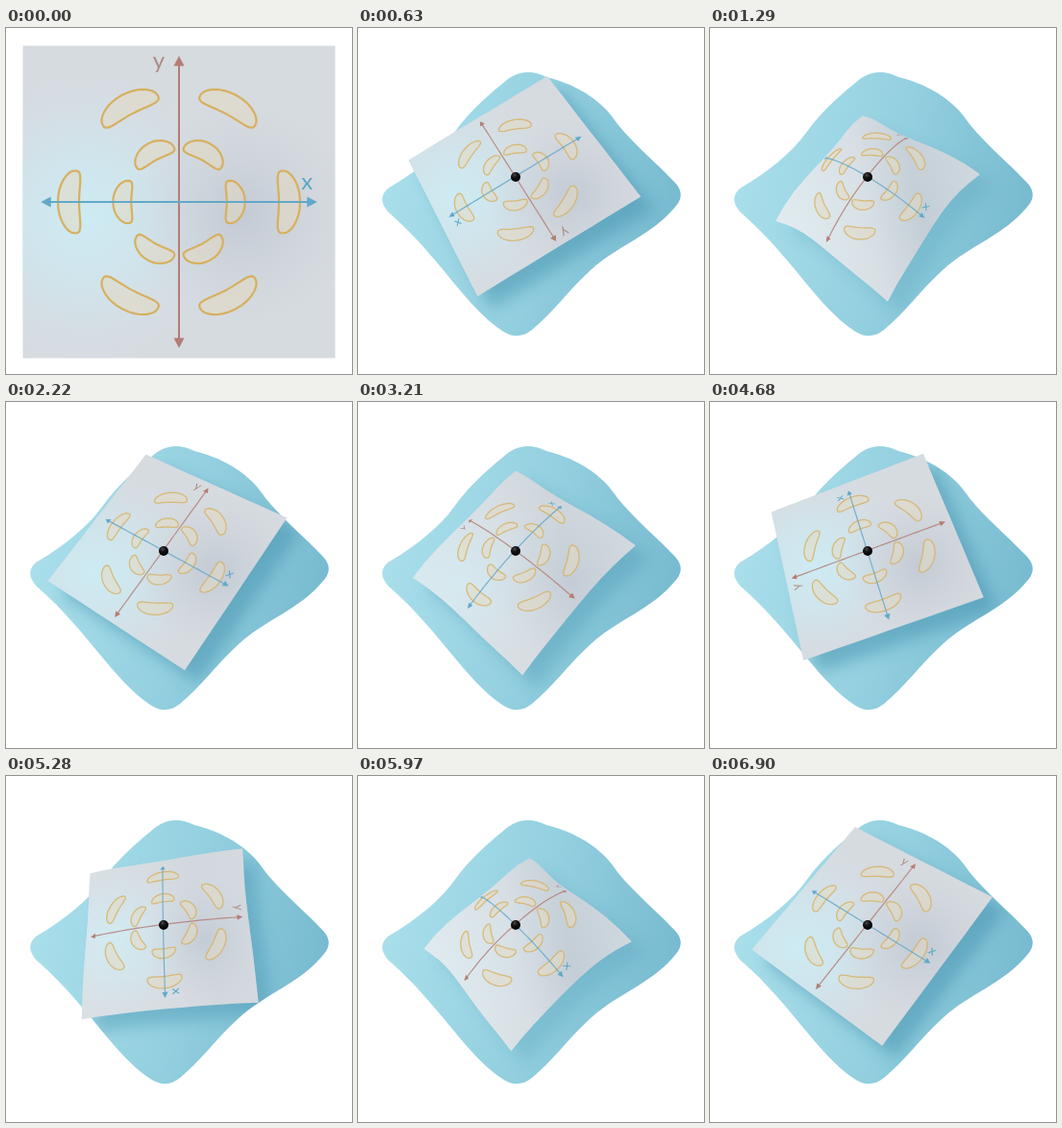
An HTML page that plays this animation: 360x360 px, repeating every 6.93 s.

```html
<!DOCTYPE html>
<html lang="en">
<head>
<meta charset="utf-8">
<title>Paper on a curved surface</title>
<style>
  html, body { margin: 0; width: 100%; height: 100%; overflow: hidden; background: #fff; }
  svg { display: block; width: 100vw; height: 100vh; }
  text { font: 24px Lato, "Open Sans", sans-serif; text-anchor: middle; }
</style>
</head>
<body>
<svg id="stage" viewBox="0 0 360 360">
  <defs>
    <linearGradient id="sea" x1="0" y1=".4" x2="1" y2=".6">
      <stop offset="0" stop-color="#aadfeb"/>
      <stop offset=".5" stop-color="#94d0e0"/>
      <stop offset="1" stop-color="#76b9cf"/>
    </linearGradient>
    <radialGradient id="glow" cx=".2" cy=".55" r=".48">
      <stop offset="0" stop-color="#cdebf3"/>
      <stop offset=".45" stop-color="#cfe6ee" stop-opacity=".8"/>
      <stop offset="1" stop-color="#d4e0e6" stop-opacity="0"/>
    </radialGradient>
    <radialGradient id="dim" cx=".7" cy=".54" r=".36">
      <stop offset="0" stop-color="#c3cad4"/>
      <stop offset="1" stop-color="#cdd3da" stop-opacity="0"/>
    </radialGradient>
    <linearGradient id="folds" x1="0" y1=".6" x2="1" y2=".4">
      <stop offset="0" stop-color="#e6edf0"/>
      <stop offset=".45" stop-color="#d8e0e5"/>
      <stop offset=".7" stop-color="#c3ced6"/>
      <stop offset="1" stop-color="#cdd7de"/>
    </linearGradient>
    <radialGradient id="ball" cx=".4" cy=".3" r=".7">
      <stop offset="0" stop-color="#4a4a4c"/>
      <stop offset=".4" stop-color="#141415"/>
      <stop offset="1" stop-color="#000"/>
    </radialGradient>
    <filter id="soft" x="-20%" y="-20%" width="140%" height="140%">
      <feGaussianBlur stdDeviation="8"/>
    </filter>
    <clipPath id="onSurface"><path id="clipShape"/></clipPath>
  </defs>
  <g id="ground">
    <path id="surface" fill="url(#sea)"/>
    <g clip-path="url(#onSurface)">
      <path id="shadow" fill="#3f8eac" filter="url(#soft)" transform="translate(14 13)"/>
    </g>
  </g>
  <g id="paper"></g>
  <circle id="dot" cx="164" cy="155" r="5" fill="url(#ball)"/>
</svg>
<script>
const LOOP = 6930, COVER_END = 30, SHEET = 162.5;
const $ = id => document.getElementById(id);
const paper = $('paper');

function add(tag, attrs) {
  const node = document.createElementNS('http://www.w3.org/2000/svg', tag);
  for (const key in attrs) node.setAttribute(key, attrs[key]);
  return paper.appendChild(node);
}

const outline = 'M156 53Q174 40 196 51C232 60 256 78 270 100C288 122 308 138 330 161' +
  'Q341 173 331 185C306 216 270 226 242 252C218 274 202 297 181 314' +
  'Q166 326 150 315C112 290 85 238 32 192Q19 178 31 167C60 150 85 130 100 109C118 84 138 68 156 53Z';
$('surface').setAttribute('d', outline);
$('clipShape').setAttribute('d', outline);

// Timing
function ease(t, from, to) {
  const x = Math.min(1, Math.max(0, (t - from) / (to - from)));
  return x * x * (3 - 2 * x);
}

// The last turn runs across the loop seam; the three add up to two full turns
const seamTurn = t => ease(t, 6770, 8020);
const turnAt = t => 90 * ease(t, 2100, 3400) + 258 * ease(t, 4300, 5600) +
  372 * (seamTurn(t) + seamTurn(t + LOOP) - 1);

const press = (t, rise, top, hold, fall) => ease(t, rise, top) - ease(t, hold, fall);
const bendAt = t => press(t, 560, 1370, 1400, 2200) +
  press(t, 2800, 3600, 3640, 4440) + press(t, 5000, 5805, 5830, 6640);

// Sheet coordinates run from -1 to 1, v pointing up
const front = ([u, v]) => [180 + SHEET * u, 181 - SHEET * v];

function sceneView(turn, bend) {
  const a = turn * Math.PI / 180, c = Math.cos(a), s = Math.sin(a);
  return ([pu, pv]) => {
    const u = pu * c - pv * s, v = pu * s + pv * c, rr = u * u + v * v;
    const w = 1 - .075 * u + .034 * v;
    // Edges on the far side curl in more than the corners
    const curl = .055 * (pu * pu - pv * pv) ** 2 * (1 + v - u);
    const scale = (1 - bend * (.17 * rr / (rr + .2) + curl)) / w;
    return [
      163.5 + (70 * u + 54.8 * v) * scale + 3.5 * bend * rr,
      154.5 + (41.9 * u - 70.3 * v) * scale + 11.8 * bend * rr
    ];
  };
}

// Shapes
const range = (n, make) => Array.from({ length: n }, (_, i) => make(i / n));
const power = (x, p) => Math.sign(x) * Math.abs(x) ** p;

const border = [[-1, 1], [1, 1], [1, -1], [-1, -1]].flatMap(([u, v], i, all) => {
  const [u2, v2] = all[(i + 1) % 4];
  return range(10, k => [u + (u2 - u) * k, v + (v2 - v) * k]);
});

function bean(angle, radius, thick, long) {
  const c = Math.cos(angle), s = Math.sin(angle);
  return range(40, k => {
    const t = k * 2 * Math.PI, side = power(Math.sin(t), .8);
    const x = (radius + thick * (2 + 11 * power(Math.cos(t), .8) - 7 * side * side)) / SHEET;
    const y = 32.5 * long * side / SHEET;
    return [x * c - y * s, x * s + y * c];
  });
}

const items = [];
const shape = (points, attrs, closed = true) =>
  items.push({ points, closed, node: add('path', attrs) });

for (const fill of ['#d6dbe0', 'url(#glow)', 'url(#dim)']) shape(border, { fill });
shape(border, { fill: 'url(#folds)', id: 'sheen' });

for (const degrees of [0, 62, 118, 180, 242, 298]) {
  const angle = degrees * Math.PI / 180;
  const look = { fill: '#e5d9c0', 'fill-opacity': .5, stroke: '#d6b060', class: 'bean' };
  shape(bean(angle, 113, 1, 1), look);
  shape(bean(angle, 57.5, .86, .68), look);
}

function axis(vertical, reach, color) {
  const at = (along, across) => vertical ? [across, along] : [along, across];
  shape(range(25, k => at(reach * (k * 25 / 12 - 1) * .96, 0)),
    { fill: 'none', stroke: color, class: 'axis' }, false);
  for (const sign of [-1, 1]) {
    const base = sign * (reach - .065);
    shape([at(sign * reach, 0), at(base, .034), at(base, -.034)], { fill: color });
  }
}
axis(true, .935, '#b37e74');
axis(false, .885, '#62a9c8');

function label(word, u, v, fill) {
  const node = add('text', { fill, y: 6 });
  node.textContent = word;
  return { node, u, v };
}
const labels = [label('y', -.13, .89, '#ab8b84'), label('x', .82, .12, '#5aa8c6')];

// Drawing
const trace = (points, view, closed) =>
  'M' + points.map(p => view(p).map(n => n.toFixed(2)).join(' ')).join('L') + (closed ? 'Z' : '');

function placeLabel({ node, u, v }, view) {
  const step = .02, unit = step * SHEET;
  const [x, y] = view([u, v]), [rx, ry] = view([u + step, v]), [dx, dy] = view([u, v - step]);
  const m = [(rx - x) / unit, (ry - y) / unit, (dx - x) / unit, (dy - y) / unit, x, y];
  node.setAttribute('transform', `matrix(${m.map(n => n.toFixed(4))})`);
}

const beans = document.querySelectorAll('.bean'), axes = document.querySelectorAll('.axis');

function setStroke(nodes, width, opacity) {
  for (const node of nodes) {
    node.setAttribute('stroke-width', width);
    node.setAttribute('stroke-opacity', opacity);
  }
}

function draw(t) {
  const cover = t < COVER_END;
  const bend = cover ? 0 : bendAt(t);
  const view = cover ? front : sceneView(turnAt(t), bend);
  for (const { points, closed, node } of items) node.setAttribute('d', trace(points, view, closed));
  for (const item of labels) placeLabel(item, view);
  setStroke(beans, cover ? 2.2 : 1.3, cover ? 1 : .8);
  setStroke(axes, cover ? 2 : 1.2, cover ? 1 : .85);
  $('sheen').setAttribute('opacity', .85 * bend);
  $('shadow').setAttribute('d', trace(border, view, true));
  $('shadow').setAttribute('opacity', .5 - .3 * bend);
  for (const id of ['ground', 'dot']) $(id).style.display = cover ? 'none' : '';
}

const start = performance.now();
function tick() {
  draw((performance.now() - start) % LOOP);
  requestAnimationFrame(tick);
}
draw(0);
requestAnimationFrame(tick);
</script>
</body>
</html>
```
